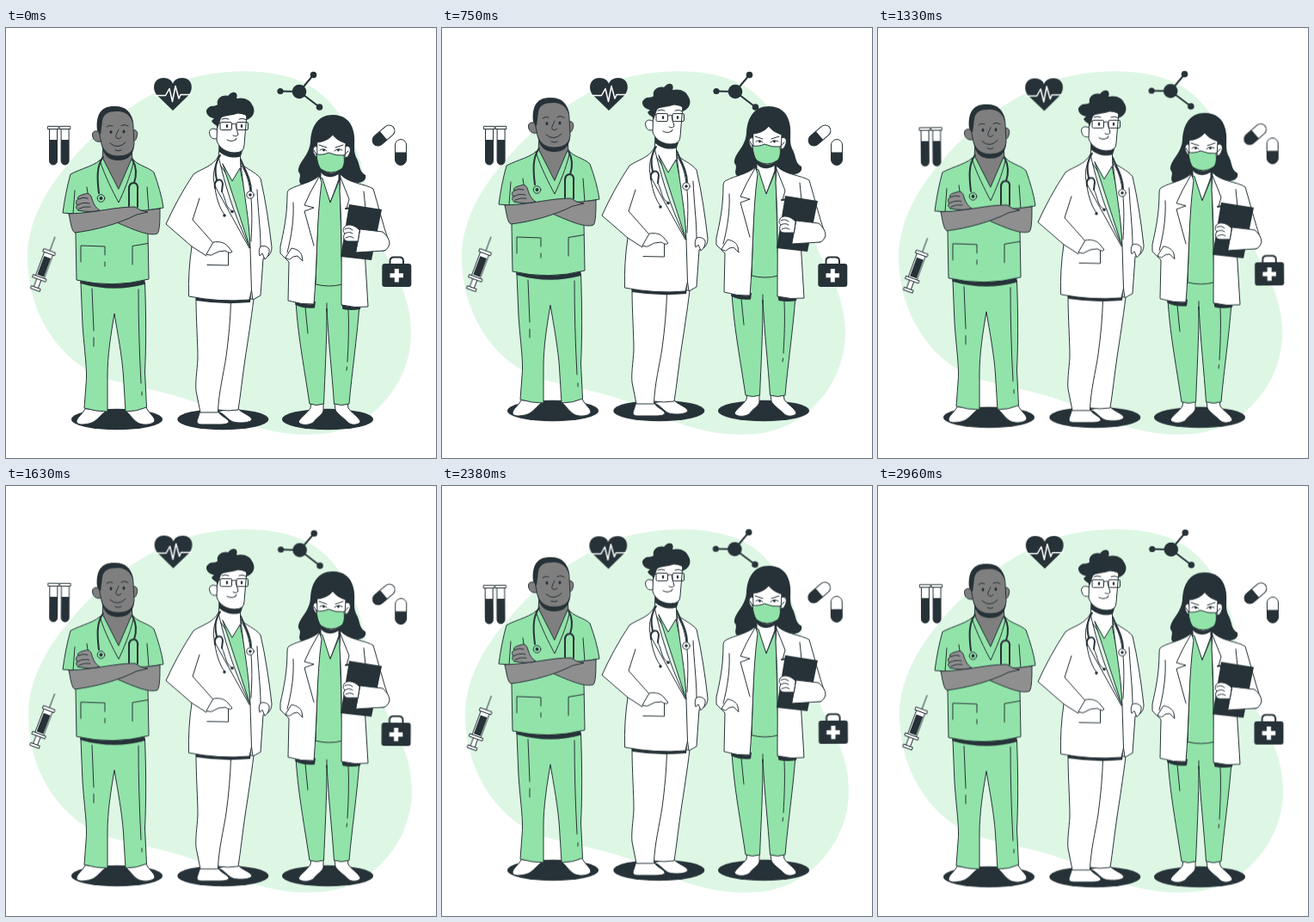
Write an HTML page that moves like this. It is 500 px wide and 500 px high and loops after 3000 ms.

```html
<!DOCTYPE html>
<html lang="en">
<head>
<meta charset="utf-8">
<title>Medical team</title>
<style>
  html, body { margin: 0; width: 100%; height: 100%; overflow: hidden; background: #fff; }
  svg { display: block; width: 100%; height: 100%; }

  .blob { fill: #def7e5; animation: shake 3s ease-out infinite; }
  .icons { transform-origin: 251px 178px; animation: wind 1.5s linear infinite; }
  .team { animation: float 1.5s linear infinite; }

  @keyframes shake {
    0%, 100% { transform: translateX(0); }
    10%, 90% { transform: translateX(-1px); }
    20%, 80% { transform: translateX(2px); }
    30%, 50%, 70% { transform: translateX(-4px); }
    40%, 60% { transform: translateX(4px); }
  }
  @keyframes wind {
    0%, 100% { transform: rotate(0deg); }
    25% { transform: rotate(1deg); }
    75% { transform: rotate(-1deg); }
  }
  @keyframes float {
    0%, 100% { transform: translateY(0); }
    50% { transform: translateY(-10px); }
  }

  .g, .w, .s, .a, .l, .t { stroke: #263238; stroke-linecap: round; stroke-linejoin: round; }
  .g { fill: #92e3a9; }
  .w { fill: #fff; }
  .s { fill: #7f7f7f; }
  .a { fill: #8f8f8f; }
  .l { fill: none; }
  .t { fill: none; stroke-width: 2; }
  .d { fill: #263238; }
  .cut { fill: none; stroke: #fff; stroke-width: 1.5; stroke-linejoin: round; }
</style>
</head>
<body>
<svg viewBox="0 0 500 500">
  <path class="blob" d="M25 265C25 225 48 185 75 155C105 118 150 82 205 61C250 47 305 46 343 62C382 80 400 115 412 155C420 190 425 225 440 260C455 290 471 315 471 355C471 410 430 462 375 471C320 478 280 462 240 444C200 424 160 420 118 408C70 393 25 340 25 265Z"/>

  <g class="icons">
    <!-- heart -->
    <path class="d" d="M194 96L175.500 78C169 70 172 58 183 58C189 58 193 61 194 65C195 61 199 58 205 58C216 58 219 70 212.500 78Z"/>
    <path class="cut" d="M172 78.500H185.500L190 70.500L193.500 85.500L197 67.500L201 82L203 77.500H216"/>

    <!-- molecule -->
    <path class="t" d="M319 73.500L341 74L357.500 54.500M341 74L364.500 92"/>
    <g class="d">
      <circle cx="341" cy="74" r="8.300"/>
      <circle cx="319" cy="73.500" r="3.600"/>
      <circle cx="357.500" cy="54.500" r="3.800"/>
      <circle cx="364.500" cy="92" r="3.800"/>
    </g>

    <!-- test tubes -->
    <g id="tube">
      <path class="w" d="M50.500 117V154.500A4.500 4.500 0 0 0 59.500 154.500V117Z"/>
      <path class="d" d="M50.500 130H59.500V154.500A4.500 4.500 0 0 1 50.500 154.500Z"/>
      <rect class="w" x="48.800" y="114.300" width="12.400" height="3.200"/>
    </g>
    <use href="#tube" x="13.600"/>

    <!-- capsules -->
    <g id="pill" transform="translate(459 144.500)">
      <rect class="w" x="-6.500" y="-15" width="13" height="30" rx="6.500"/>
      <path class="d" d="M-6.500 0H6.500V8.500A6.500 6.500 0 0 1 -6.500 8.500Z"/>
    </g>
    <use href="#pill" transform="translate(439 125) rotate(49) translate(-459 -144.500)"/>

    <!-- first aid bag -->
    <path class="t" d="M446.500 275V271Q446.500 266.500 451 266.500H457.500Q462 266.500 462 271V275"/>
    <rect class="d" x="437.300" y="274" width="34" height="27" rx="3"/>
    <path d="M454.300 280V295.500M446.500 287.700H462" fill="none" stroke="#fff" stroke-width="5"/>

    <!-- syringe -->
    <g transform="translate(45 275) rotate(20.500)">
      <path class="l" d="M0 -34V-17"/>
      <path class="w" d="M-2.500 18H2.500V29H-2.500Z"/>
      <rect class="w" x="-5" y="-14" width="10" height="31"/>
      <rect class="d" x="-4" y="-9" width="8" height="23"/>
      <rect class="w" x="-7" y="-17" width="14" height="3.500"/>
      <rect class="w" x="-8" y="15.500" width="16" height="3.200"/>
      <rect class="w" x="-5.500" y="28.500" width="11" height="3.200"/>
    </g>
  </g>

  <g class="team">
    <g class="d">
      <ellipse id="shade" cx="129" cy="455" rx="53" ry="12.300"/>
      <use href="#shade" x="123.300"/>
      <use href="#shade" x="245"/>
    </g>

    <!-- nurse with folded arms -->
    <g>
      <path class="w" d="M92 443C89 449 82 453 82 458C83 463 96 461 102 458C108 454 112 448 117 445Z"/>
      <path class="w" d="M139 445C144 449 147 455 153 459C160 463 173 461 173 456C172 451 165 447 163 441Z"/>
      <path class="g" d="M87 296L89 345C91 375 95 398 93 415L91 442Q105 446 118 446V405C118 380 122 356 126 332C130 356 135 382 136.500 405L139 446Q152 446 163.500 441L161.500 400C163 370 163 335 161.500 296Z"/>
      <path class="l" d="M100 303L102 352M102 360V370M154 304C154 340 155 375 157 413M158 423V427"/>
      <path class="d" d="M85.500 289L86.500 297Q125 308 161 298L162 289Z"/>

      <path class="s" d="M113 137L112 153L131 190L147 155L146 137Z"/>
      <path class="g" d="M112 151C105 160 88 163 75 170C71 184 68 200 66 215L78 216L81 238L82 293Q124 303 166 292L165 238V212L183 209C181 195 177 182 172 168C165 161 152 160 146.500 151L131 187Z"/>
      <path class="l" d="M109 154C115 172 124 190 131 203C137 190 144 174 148 157M80 189L78 216M94 185L95 192M164 185L166 212"/>
      <path class="l" d="M87 272V253L115 254V264M115 272V277M147 275V253.500L165 250.500"/>

      <path class="a" d="M162 212L179 210C179 222 179 236 176 239C166 243 145 233 124 224L140 213Z"/>
      <path class="a" d="M73 216C75 225 76 236 80 238C104 235 130 228 152 217L165 214Q156 213 150 208C125 208 105 215 73 216Z"/>
      <path class="a" d="M84 212C81 210 81 207 83 206C80 203 82 200 84 199C82 196 87 194 92 193C96 191 99 194 100 199C102 204 103 208 109 212Q97 215 84 212Z"/>
      <path class="l" d="M84 199Q90 196 95 198M83 206Q90 202 97 204M85 210Q91 207 98 208"/>

      <path class="t" d="M113 150C105 160 106 176 108 192M147 153C152 162 152 171 149 180Q143 180 143 187V207M149 180Q154 181 153 188V208"/>
      <circle class="g" cx="110.500" cy="198" r="4.300"/>
      <circle class="d" cx="110.500" cy="198" r="2"/>

      <path class="d" d="M111 134C112 146 118 153 128 154C140 155 148 149 149 137Z"/>
      <path class="s" d="M109 121C103 118 99 121 101 127C102 131 106 133 110 132Z"/>
      <path class="s" d="M147 119C152 117 154 122 152 127C151 131 149 132 147 131Z"/>
      <path class="s" d="M107 115C108 99 119 93 130 93C143 94 148 104 148 115L149 135C148 145 141 149 130 149C118 149 111 141 110 130Z"/>
      <path class="d" d="M106 119C104 99 112 91 125 91C137 90 146 96 147.500 110C143 99 137 97 129 97C119 97 113 100 112 108L110 124Z"/>
      <ellipse class="d" cx="122" cy="121" rx="1.500" ry="2.100"/>
      <ellipse class="d" cx="137" cy="120.500" rx="1.500" ry="2.100"/>
      <path class="l" d="M117 115Q120 112 124 114M134 113.500Q138 111 142 114M131 118C129 123 126 127 129 128Q131 130 134 127M121 134Q130 142 139 133M127 142Q131 144 134 142"/>
    </g>

    <!-- doctor with glasses -->
    <g>
      <path class="w" d="M246 446C254 448 257 455 264 458C272 460 285 459 286 455C284 450 274 448 269 442Z"/>
      <path class="w" d="M226 445L222 457Q222 461 227 461H245C252 461 260 461 259 457C256 453 249 451 246 445Z"/>
      <path class="w" d="M257 315H288C285 340 281 365 278 385C275 405 273 425 270 444Q258 446 246 444Z"/>
      <path class="w" d="M221 313C221 340 223 365 223 385C222 400 220 412 221 422L226 447H246.500C247 425 253 402 256 382C259 360 261 338 261.500 318Z"/>
      <path class="d" d="M220 308L221 317Q252 322 284 319L285 309Z"/>

      <path class="w" d="M248 137L247 156L263 180L273 163L272 140Z"/>
      <path class="g" d="M252 158L263 178L272 163C279 195 284 225 284 256Z"/>
      <path class="w" d="M247 149C241 161 228 163 218 170C206 188 195 208 186 228L216 254C213 274 212 293 212.500 312Q248 319 283 316L285.500 305L287 316L296 311L299 268L304 266Q309 262 309 255C306 229 302 201 296 175C290 167 279 164 273 157C276 190 283 222 284 256C271 229 258 198 247 149Z"/>
      <path class="l" d="M225 198L217 223L241 250M216 254L233 265M292 188C293 212 296 235 296 253M284 256L285.500 305M246 153C239 170 240 180 247 191L283 256M274 160C283 174 288 195 285 248"/>
      <path class="l" d="M234 275.500L258.500 276V261"/>
      <path class="w" d="M233 263L241 249C248 248 254 249 258 254L263 260Q261 263 255 259L247 260L239 264Z"/>
      <path class="w" d="M296 254Q293 258 295 265L298 262L301 269Q307 264 306 257Q302 252 296 254Z"/>
      <path class="t" d="M249 148C242 159 243 168 245 177M243 186C241 176 251 173 252 181L251 190M273 153C278 166 285 176 285 190"/>
      <path class="l" d="M243 186C245 201 250 212 254 217M251 190C256 200 255 209 263 213"/>
      <circle class="d" cx="254" cy="218" r="1.800"/>
      <circle class="d" cx="263" cy="213.500" r="1.800"/>
      <circle class="w" cx="284" cy="194" r="4.200"/>
      <circle class="d" cx="284" cy="194" r="1.800"/>

      <path class="d" d="M247 132L248 144C256 151 267 152 273 149L276 140Z"/>
      <path class="w" d="M245 118C239 115 235 119 237 124C238 129 243 130 246 128Z"/>
      <path class="w" d="M246 98L245 131C248 140 257 145 266 145Q277 145 277 136L280 100Z"/>
      <path class="d" d="M246 117C246 112 241 113 239 108L242 105C235 104 230 97 235 93C239 89 243 92 246 89C244 82 252 77 258 79C263 72 271 74 268 82C277 80 284 84 286 89C291 96 288 104 280 107C281 100 276 101 270 99C262 103 253 101 250 105Z"/>
      <rect class="l" x="249" y="109.500" width="13.500" height="9" rx="1.500"/>
      <rect class="l" x="268" y="109.500" width="13.500" height="9" rx="1.500"/>
      <path class="l" d="M244 110.500H249M262.500 112Q265 110 268 112M251 106Q255 104 259 106M271 106Q275 104 279 106.500M267 113L270 124Q268 127 264 125M257 130Q262 133 267 130M267 130L268 128"/>
      <ellipse class="d" cx="257" cy="114" rx="1.300" ry="2"/>
      <ellipse class="d" cx="274" cy="114" rx="1.300" ry="2"/>
    </g>

    <!-- doctor with mask -->
    <g>
      <path class="w" d="M355 435L354 442C350 448 342 453 340 458C343 463 354 462 358 458C361 453 368 450 369 445L369 436Z"/>
      <path class="w" d="M382 436L383 444C386 450 394 454 398 459C403 463 412 461 412 457C409 451 401 447 398 442L397 435Z"/>
      <path class="g" d="M362 292L337 318C339 350 344 380 348 405L353 437Q361 440 369.500 437C371 400 373 365 373 326C375 365 379 400 381.500 437Q390 440 399 437C402 402 408 362 411 322L390 292Z"/>
      <path class="l" d="M373 320V330M348 325L351 355M398 328C399 350 398 370 397 388M396.500 394L396 398"/>
      <path class="d" d="M335.500 316L336.500 322Q348 327 359 325.500L360 318ZM390 320L391.500 327Q402 329 412 327L413 321Z"/>

      <path class="d" d="M380 101C363 101 355 114 354 132C353 149 339 156 340 167C345 172 338 177 343 182C350 186 357 182 364 181L405 179C411 182 420 178 418 171C410 167 412 158 407 150C403 141 407 132 404 120C401 107 392 101 380 101Z"/>
      <path class="w" d="M366 160V176L377 203L387 176V160Z"/>
      <path class="g" d="M364 175L360 298Q376 302 391 298L388 176L377 203L368 175Z"/>

      <path class="w" d="M364 172C355 180 340 182 331 187Q327 188 327 194C327 218 323 236 319 254L319 262L329 272L328 317Q344 322 358 321C362 275 361 222 367 180Z"/>
      <path class="w" d="M389 170L388 190C391 235 390 280 390 322Q406 326 421 324L417 258L440 259Q446 255 445 248C438 228 433 207 427 187C418 181 398 181 389 170Z"/>
      <path class="l" d="M364 173L354 191L347 206L358 209L347 213L358 253M334 203C335 222 332 242 327 261M389 174L399 199L396 210M416 190L418 210"/>
      <path class="w" d="M325 267L332 256C338 257 343 260 344 265L345 271L339 265L334 266L330 269Z"/>

      <path class="d" d="M399 205L437 211L425 270L389 266Z"/>
      <path class="l" d="M395 210L403 209" style="stroke-width:2"/>
      <path class="w" d="M412 234L438 237Q446 244 446 251Q444 258 439 259L407 261Z"/>
      <path class="w" d="M411 235C405 228 396 227 393 232C391 236 393 238 394 239C391 243 393 248 398 248L409 248Z"/>
      <path class="l" d="M394 234Q399 231 403 235M394 239Q399 236 403 239M395 244Q400 241 404 244"/>

      <path class="d" d="M362 158C364 171 373 174 379 173C386 172 392 167 393 157Z"/>
      <path class="w" d="M362 138C357 136 356 142 358 146Q360 151 364 150Z"/>
      <path class="w" d="M394 138C400 135 402 141 399 147Q397 152 393 150Z"/>
      <path class="w" d="M362 133C370 132 376 129 380 124C384 130 390 132 395 134L394 152C390 166 384 169 378 169C370 169 363 161 362 150Z"/>
      <path class="g" d="M361 147Q369 148 375 145Q384 149 393 148C394 156 393 161 390 164Q378 172 366 164Q362 159 361 147Z"/>
      <path class="l" d="M358 142L361 147M398 143L393 148M364 136L373 139M383 139L392 136M365 142Q369 139 373 143M382 143Q386 139 391 142"/>
      <circle class="d" cx="369.500" cy="142" r="1.400"/>
      <circle class="d" cx="386.500" cy="142" r="1.400"/>
    </g>
  </g>
</svg>
</body>
</html>
```
